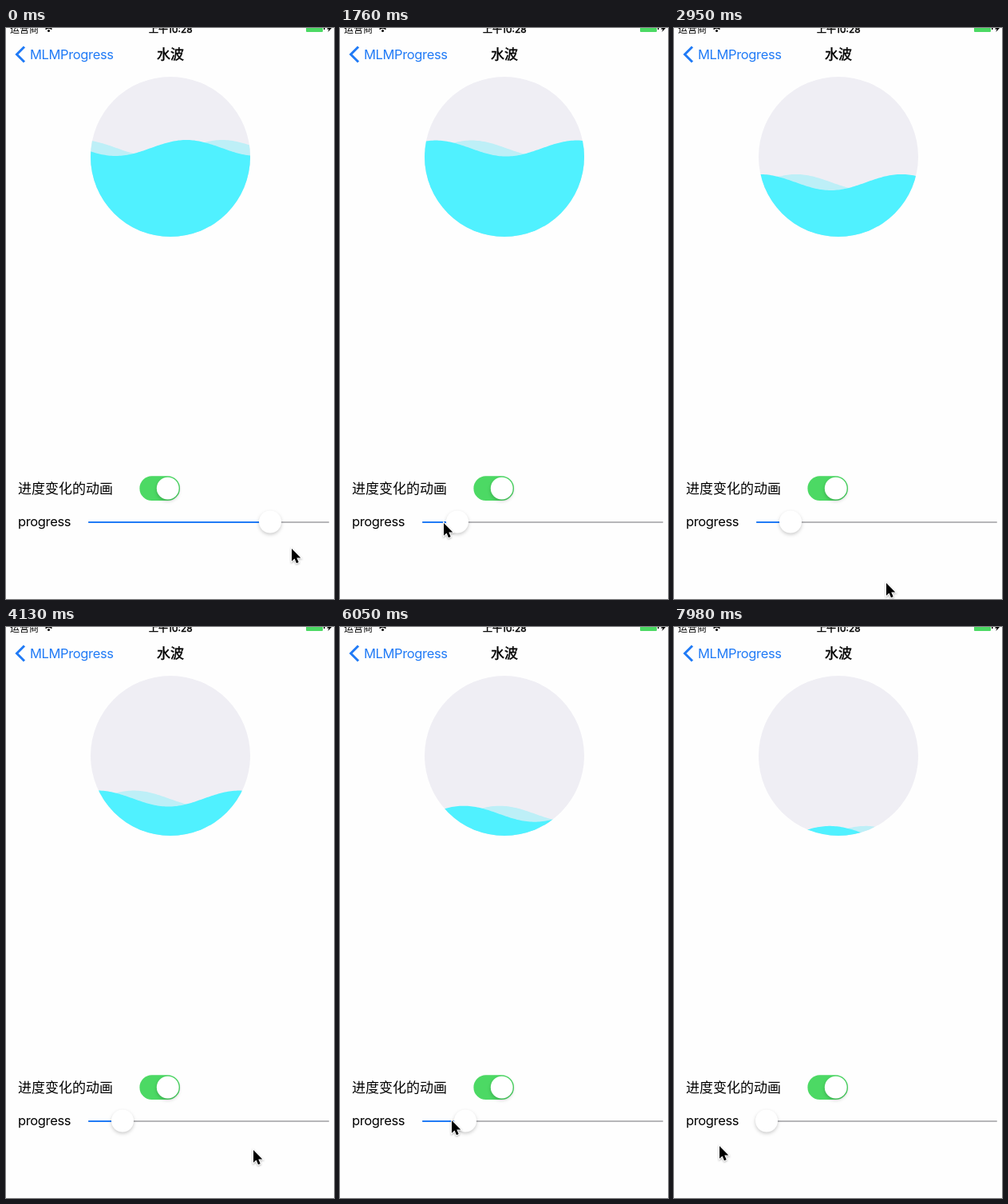
These frames come from a looping animation (411x714 px, 8000 ms). An HTML page:

```html
<!DOCTYPE html>
<html lang="zh-CN">
<head>
<meta charset="utf-8">
<title>水波</title>
<style>
  html, body { margin: 0; width: 100%; height: 100%; overflow: hidden; background: #fefefe; }
  svg { display: block; width: 100%; height: 100%; }
  text { font-family: Inter, "Noto Sans CJK SC", "Noto Sans CJK", sans-serif; font-size: 17px; }
  .latin { font-size: 16.5px; letter-spacing: -.36px; }
  .status { font-size: 12px; }
  .medium { stroke: #000; stroke-width: .45px; }
  .blue { fill: #217bf6; }
  .knob { fill: #fff; filter: drop-shadow(0 2px 2px rgba(0, 0, 0, .2)); }
  #cursor { stroke: #fff; stroke-width: 2px; paint-order: stroke; filter: drop-shadow(0 1px 1px rgba(0, 0, 0, .3)); }
</style>
</head>
<body>
<svg viewBox="0 0 411 714">
  <defs><clipPath id="disc"><circle cx="206" cy="161" r="100"/></clipPath></defs>

  <text class="status" x="5" y="6">运营商</text>
  <path d="M49.500 1.500Q53.500 -1.500 57.500 1.500" fill="none" stroke="#000" stroke-width="1.600"/>
  <circle cx="53.500" cy="3.500" r="1.500"/>
  <text class="status medium" x="179" y="6">上午10:28</text>
  <rect x="376" y="-4" width="21" height="9" rx="1" fill="#4cd964"/>
  <path d="M398 -2h1.500v4H398ZM405 -3L402 1.500H404.500L403.500 5L408 0H405.500Z"/>

  <path d="M23 23.500L13.500 33L23 42.500" fill="none" stroke="#217bf6" stroke-width="3"/>
  <text class="latin blue" x="30" y="39">MLMProgress</text>
  <text class="medium" x="189" y="39">水波</text>

  <circle cx="206" cy="161" r="100" fill="#efeef4"/>
  <g clip-path="url(#disc)">
    <path id="back" fill="#bdeff7"/>
    <path id="front" fill="#50f1ff"/>
  </g>

  <text x="15" y="582">进度变化的动画</text>
  <rect x="167.400" y="560.300" width="50.600" height="30.800" rx="15.400" fill="#4cd964"/>
  <circle class="knob" cx="202.700" cy="575.700" r="13.900"/>

  <text class="latin" x="15" y="623">progress</text>
  <rect x="103" y="617" width="302" height="2" rx="1" fill="#b6b6b9"/>
  <rect id="filled" class="blue" x="103" y="617" height="2" rx="1"/>
  <circle id="thumb" class="knob" cy="617.500" r="14"/>

  <path id="cursor" d="M0 0V15.800L3.600 12.500L6 18.200L8.700 17L6.300 11.500H11.300Z"/>
</svg>
<script>
const LOOP = 8000, STEP = 147.6;
const PERIOD = 177, AMPLITUDE = 10, LAG = 45, WAVE_SPEED = 23.6;
const GRAB = 17, THUMB_MIN = 116;
const FIRST_DRAG = 9, FIRST_DROP = 12, SECOND_DRAG = 33;

// The water clock stalls briefly: [step, tick]
const clock = [[0, 0], [20, 20], [28, 27.2], [54, 53.8]];

// Where the pointer turns: [step, x, y]
const pointer = [[0, 358, 651], [6, 372, 673], [FIRST_DRAG, 314, 619], [FIRST_DROP, 130, 619],
  [16, 215, 694], [20, 266, 694], [28, 310, 654], [SECOND_DRAG, 129, 619], [41, 140, 617],
  [47, 7, 638], [54, 57, 649]];

// Each slider change sends the water towards a new level.
const glides = [
  { start: 0, target: 105, rate: .08 },
  { start: 9, target: 245, rate: .0745 },
  { start: 42.2, target: 261, rate: .215 },
];

const $ = id => document.getElementById(id);

function sample(keys, step) {
  const next = Math.max(1, keys.findIndex(key => key[0] >= step));
  const a = keys[next - 1], b = keys[next];
  const k = (step - a[0]) / (b[0] - a[0]);
  return a.slice(1).map((v, i) => v + (b[i + 1] - v) * k);
}

function waterLevel(tick) {
  let level = 150;
  glides.forEach(({ start, target, rate }, i) => {
    const end = Math.min(tick, glides[i + 1]?.start ?? Infinity);
    if (end > start) level = target + (level - target) * Math.exp(-rate * (end - start));
  });
  return level;
}

function thumbAt(step, pointerX) {
  if (step < FIRST_DRAG) return 331;
  if (step > FIRST_DROP && step < SECOND_DRAG) return 146;
  return Math.max(THUMB_MIN, pointerX + GRAB);
}

function wave(level, crest) {
  let d = 'M106 262';
  for (let x = 106; x <= 306; x += 2) {
    const y = level - AMPLITUDE * Math.cos(2 * Math.PI * (x - crest) / PERIOD);
    d += `L${x} ${y.toFixed(2)}`;
  }
  return d + 'V262Z';
}

function draw() {
  const time = performance.now() % LOOP;
  const step = Math.min(54, Math.floor((time + 12) / STEP));
  const [tick] = sample(clock, step);
  const [x, y] = sample(pointer, step);
  const level = waterLevel(tick);
  const crest = 226 - WAVE_SPEED * tick;
  const thumb = thumbAt(step, x);
  $('front').setAttribute('d', wave(level, crest));
  $('back').setAttribute('d', wave(level, crest + LAG));
  $('thumb').setAttribute('cx', thumb);
  $('filled').setAttribute('width', thumb - 103);
  $('cursor').setAttribute('transform', `translate(${x} ${y})`);
  requestAnimationFrame(draw);
}
draw();
</script>
</body>
</html>
```
